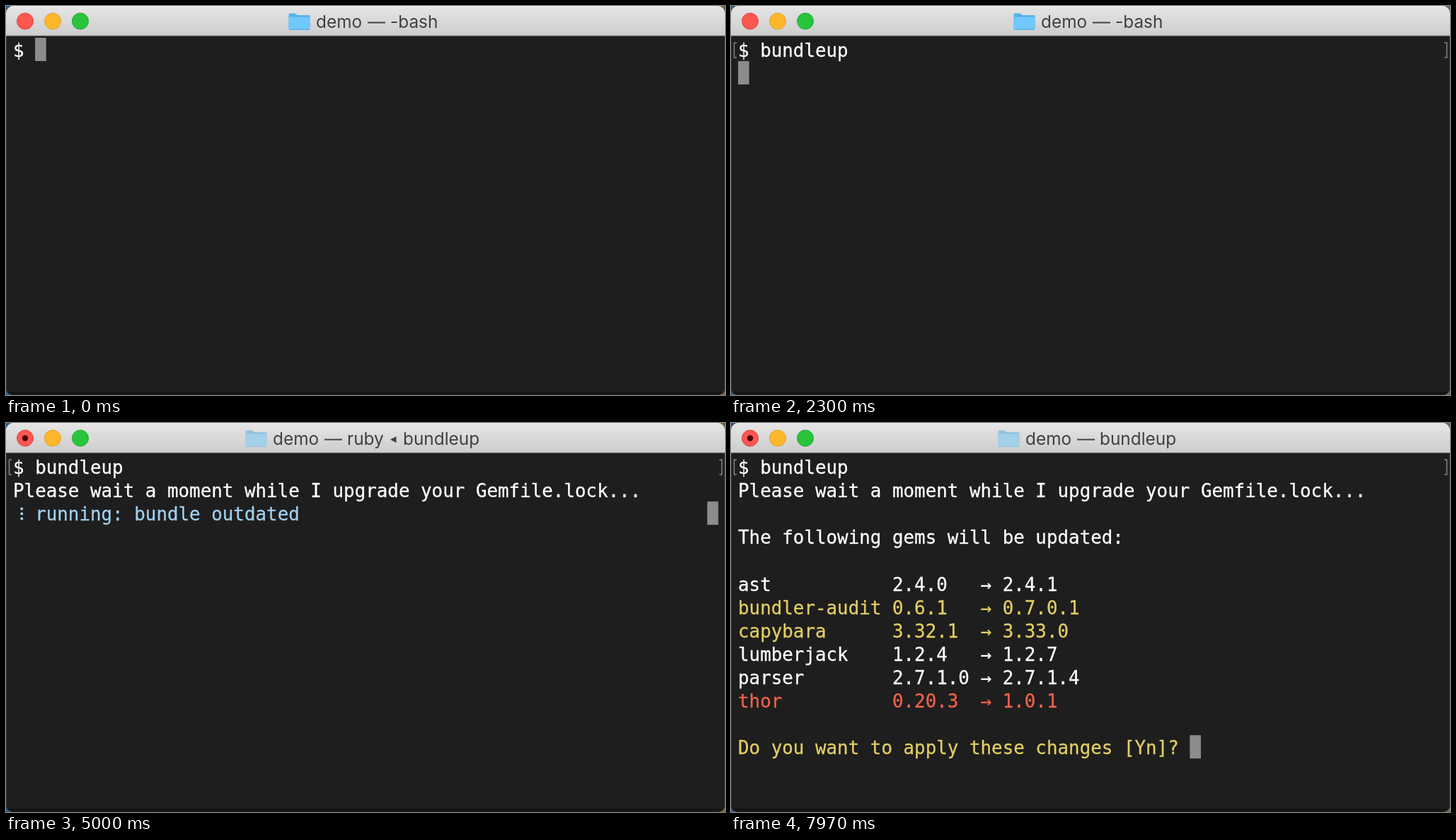
An HTML page for the animation above (8000 ms loop, 1016 by 551 pixels).

```html
<!DOCTYPE html>
<html lang="en">
<head>
<meta charset="utf-8">
<title>Terminal demo</title>
<style>
  html, body { margin: 0; width: 100%; height: 100%; overflow: hidden; background: #315a7c; }
  svg { display: block; width: 1016px; height: 551px; }
  text { white-space: pre; }
  #screen text { font: 25.86px "DejaVu Sans Mono", Menlo, monospace; stroke: currentColor; stroke-width: .3px; fill: currentColor; }
  #title text { font: 24.4px Inter, sans-serif; fill: #404040; }
</style>
</head>
<body>
<svg viewBox="0 0 1016 551">
  <defs>
    <linearGradient id="bar" x2="0" y2="1">
      <stop stop-color="#e5e5e5"/><stop offset="1" stop-color="#cdcdcd"/>
    </linearGradient>
    <linearGradient id="desk">
      <stop stop-color="#315a7c"/><stop offset=".75" stop-color="#3a5f7c"/><stop offset="1" stop-color="#6b6a45"/>
    </linearGradient>
    <clipPath id="win"><rect width="1016" height="551" rx="10"/></clipPath>
  </defs>
  <rect width="1016" height="551" fill="url(#desk)"/>
  <g clip-path="url(#win)">
    <rect width="1016" height="551" fill="#1e1e1e"/>
    <path d="M0 548.5H1016" stroke="#151515" stroke-width="5"/>
    <path d="M.5 42V551M1015.5 42V551" stroke="#393939"/>
    <rect width="1016" height="42" fill="url(#bar)"/>
    <path d="M0 .7H1016" stroke="#f2f2f2"/>
    <path d="M0 42H1016" stroke="#a2a2a2"/>
  </g>
  <g stroke-width="1">
    <circle cx="27" cy="21.5" r="11.5" fill="#fd5750" stroke="#df443e"/>
    <circle cx="66" cy="21.5" r="11.5" fill="#fdb72b" stroke="#dea035"/>
    <circle cx="105" cy="21.5" r="11.5" fill="#28c53b" stroke="#22a934"/>
  </g>
  <g id="title"></g>
  <g id="screen"></g>
</svg>
<script>
const LOOP = 8000, CELL = 15.57, ROW = 33.1;
const WHITE = '#fff', BLUE = '#a1d0f0', YELLOW = '#e3ce63', RED = '#f4604d';
const KEYS = [970, 1100, 1220, 1370, 1490, 1610, 1740, 1880];
const ENTER = 2200, RUN = 2395, UPDATE = 2950, OUTDATED = 4300, DONE = 5900;
const SPINNER = '⠋⠙⠹⠸⠼⠴⠦⠧⠇⠏';
const GEMS = [
  ['ast', '2.4.0', '2.4.1', WHITE],
  ['bundler-audit', '0.6.1', '0.7.0.1', YELLOW],
  ['capybara', '3.32.1', '3.33.0', YELLOW],
  ['lumberjack', '1.2.4', '1.2.7', WHITE],
  ['parser', '2.7.1.0', '2.7.1.4', WHITE],
  ['thor', '0.20.3', '1.0.1', RED]
];
const $ = id => document.getElementById(id);

const line = (row, text, color = WHITE, col = 0) =>
  `<text x="${10 + col * CELL}" y="${72 + row * ROW}" color="${color}">${text}</text>`;

const cursor = (row, col) =>
  `<rect x="${10 + col * CELL}" y="${45 + row * ROW}" width="15.6" height="33" fill="#8c8c8c"/>`;

// Braille code bits 0-2 are the left column, 3-5 the right one
function spinner(t) {
  const pause = t < OUTDATED ? 0 : 130;
  const step = Math.floor((t - RUN - pause) / 105);
  const bits = SPINNER.charCodeAt(step % 10) - 0x2800;
  let out = '';
  for (let i = 0; i < 6; i++) {
    if (bits >> i & 1)
      out += `<circle cx="${15.3 + 7 * Math.floor(i / 3)}" cy="${121.5 + 7 * (i % 3)}" r="2" fill="${BLUE}"/>`;
  }
  return out;
}

function title(t) {
  const run = t >= RUN;
  const x = !run ? 438 : t < DONE ? 377 : 416;
  const word = (dx, s) => `<text x="${x + dx}" y="31">${s}</text>`;
  const [top, face, edge] = run ? ['#91c2de', '#a3d0ea', '#8dbdd8'] : ['#51b2e8', '#70c9fa', '#4da9dc'];
  let out = `<g transform="translate(${x - 38.5} 10)">
    <path d="M0 2Q0 .5 1.5 .5H9L12 3H28.5Q30 3 30 4.5V22Q30 23.5 28.5 23.5H1.5Q0 23.5 0 22Z" fill="${top}"/>
    <path d="M0 5.5H30V22Q30 23.5 28.5 23.5H1.5Q0 23.5 0 22Z" fill="${face}"/>
    <path d="M1 23.2H29" stroke="${edge}"/></g>`;
  out += word(0, 'demo') + `<path d="M${x + 73} 23.5h25" stroke="#404040" stroke-width="2"/>`;
  if (!run) return out + word(105, '-bash');
  out += '<circle cx="27" cy="21.5" r="4.2" fill="#4c0504"/>';
  if (t >= DONE) return out + word(105, 'bundleup');
  return out + word(105, 'ruby') + word(184, 'bundleup') +
    `<path d="M${x + 166} 23.5l8.5-4.5v9z" fill="#404040"/>`;
}

function screen(t) {
  const typed = KEYS.filter(k => t >= k).length;
  let out = line(0, '$ ' + 'bundleup'.slice(0, typed));
  if (t < ENTER) return out + cursor(0, 2 + typed);

  out += '<path d="M8 52H4.5V73H8M1008 52H1011.5V73H1008" fill="none" stroke="#858585" stroke-width="1.5"/>';
  if (t < RUN) return out + cursor(1, 0);

  out += line(1, 'Please wait a moment while I upgrade your Gemfile.lock...');
  if (t < DONE) {
    const command = t < UPDATE ? 'list' : t < OUTDATED ? 'update' : 'outdated';
    return out + spinner(t) + line(2, 'running: bundle ' + command, BLUE, 2) + cursor(2, 63);
  }
  out += line(3, 'The following gems will be updated:');
  GEMS.forEach(([name, from, to, color], i) => {
    out += line(5 + i, name.padEnd(14) + from.padEnd(8) + '→ ' + to, color);
  });
  return out + line(12, 'Do you want to apply these changes [Yn]?', YELLOW) + cursor(12, 41);
}

const last = {};
function update(id, html) {
  if (last[id] !== html) $(id).innerHTML = last[id] = html;
}

function draw() {
  const t = performance.now() % LOOP;
  update('title', title(t));
  update('screen', screen(t));
  requestAnimationFrame(draw);
}
draw();
</script>
</body>
</html>
```
